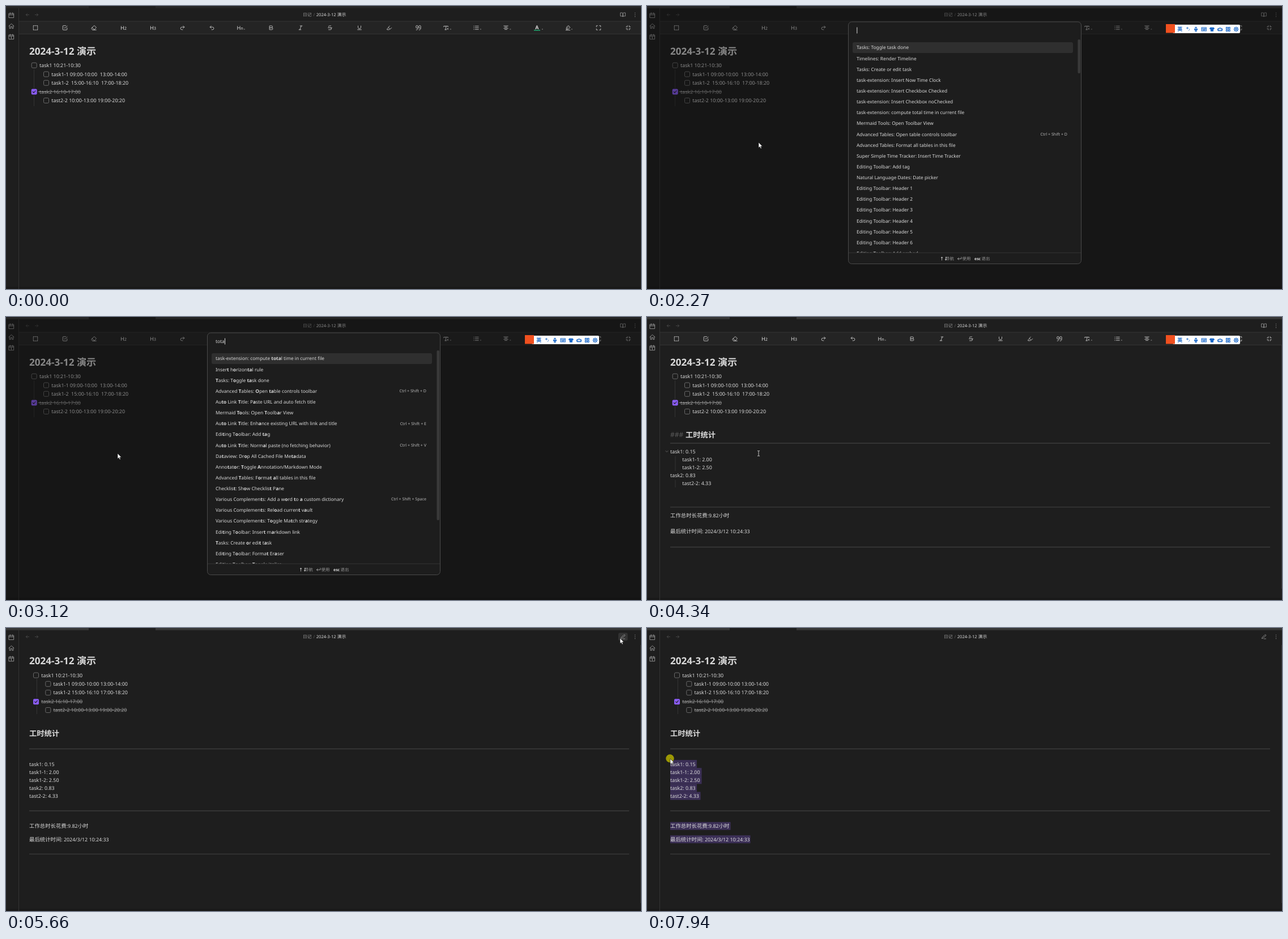
Recreate the animation shown at these times as an HTML page. Size 1121 px wide and 500 px high, loop 8000 ms.

```html
<!DOCTYPE html>
<html lang="zh-CN">
<head>
<meta charset="utf-8">
<title>2024-3-12 演示</title>
<style>
  html, body { margin: 0; width: 100%; height: 100%; overflow: hidden; background: #1e1e1e; }
  svg { display: block; }
  text {
    font-family: "Noto Sans", "Noto Sans CJK SC", "Noto Sans CJK", sans-serif;
    fill: #dadada; white-space: pre; text-rendering: geometricPrecision;
  }
  .bold { font-weight: 700; }
  .muted { fill: #999; }
  .done { fill: #999; text-decoration: line-through; }
  .icon { fill: none; stroke: #d4d4d4; stroke-width: 2; stroke-linecap: round; stroke-linejoin: round; }
  .soft { stroke: #a2a2a2; }
  .faint { stroke: #555; }
  .ime .icon { stroke: #1766c8; }
  .ime text { fill: #1766c8; }
  .rule { stroke: #3b3b3b; stroke-width: 1.3; }
  .guide { stroke: #343434; }
</style>
</head>
<body>
<svg id="stage" width="1121" height="500" viewBox="0 0 1121 500"></svg>
<script>
const LOOP = 8000;
const stage = document.getElementById('stage');

// Drawing helpers: x is the left edge of text, y its vertical middle.
const widenCjk = s => s.replace(/[\u4e00-\u9fff]+/g, '<tspan font-size="1.055em">$&</tspan>');
const text = (x, y, s, size = 8.9, cls = '', extra = '') =>
  `<text x="${x}" y="${y + size * .36}" font-size="${size}" class="${cls}" ${extra}>${cls.includes('bold') ? s : widenCjk(s)}</text>`;
const rect = (x, y, w, h, fill, r = 0, extra = '') =>
  `<rect x="${x}" y="${y}" width="${w}" height="${h}" rx="${r}" fill="${fill}" ${extra}/>`;
const line = (x1, y1, x2, y2, cls) => `<line x1="${x1}" y1="${y1}" x2="${x2}" y2="${y2}" class="${cls}"/>`;
const icon = (x, y, d, size = 10, cls = '', extra = '') =>
  `<path class="icon ${cls}" d="${d}" transform="translate(${x - size / 2} ${y - size / 2}) scale(${size / 24})" ${extra}/>`;
const group = (id, body, extra = '') => `<g id="${id}" ${extra}>${body}</g>`;
const rules = ys => ys.map(y => line(41, y, 1100, y, 'rule')).join('');

const ICON = {
  select: 'M3 7V3h4M10 3h4M17 3h4v4M21 10v4M21 17v4h-4M14 21h-4M7 21H3v-4M3 14v-4',
  check: 'M9 11l3 3L22 4M21 12v7a2 2 0 0 1-2 2H5a2 2 0 0 1-2-2V5a2 2 0 0 1 2-2h11',
  eraser: 'm7 21-4.3-4.3c-1-1-1-2.5 0-3.4l9.6-9.6c1-1 2.5-1 3.4 0l5.6 5.6c1 1 1 2.5 0 3.4L13 21M22 21H7M5 11l9 9',
  redo: 'M15 14l5-5-5-5M20 9H9.5a5.5 5.5 0 0 0 0 11H13',
  undo: 'M9 14L4 9l5-5M4 9h10.5a5.5 5.5 0 0 1 0 11H11',
  bold: 'M6 4h8a4 4 0 0 1 0 8H6zM6 12h9a4 4 0 0 1 0 8H6z',
  italic: 'M19 4h-9M14 20H5M15 4L9 20',
  strike: 'M16 4H9a3 3 0 0 0-2.8 4M14 12a4 4 0 0 1 0 8H6M4 12h16',
  underline: 'M6 4v6a6 6 0 0 0 12 0V4M4 20h16',
  marker: 'm9 11-6 6v3h9l3-3M22 12l-4.6 4.6a2 2 0 0 1-2.8 0l-5.2-5.2a2 2 0 0 1 0-2.8L14 4',
  quote: 'M3 21c3 0 7-1 7-8V5c0-1.2-.8-2-2-2H4C2.800 3 2 3.800 2 5v6c0 1.200.800 2 2 2h4M15 21c3 0 7-1 7-8V5c0-1.200-.800-2-2-2h-4c-1.200 0-2 .800-2 2v6c0 1.200.800 2 2 2h4',
  clear: 'M2 8V5h18v3M7 20h6M12 5l-3 15M16 14l5 5M21 14l-5 5',
  list: 'M8 5h14M8 12h14M8 19h14M2 5h1M2 12h1M2 19h1',
  center: 'M21 4H3M17 9H7M21 14H3M17 19H7',
  pen: 'M5 15l3-8 7-4 6 8-6 6-8 2zM3 22h18M8 16l5-6',
  expand: 'M8 3H3v5M21 8V3h-5M3 16v5h5M16 21h5v-5',
  shrink: 'M8 3v5H3M21 8h-5V3M3 16h5v5M16 21v-5h5',
  calendar: 'M2 4h20v18H2zM2 10h20M7 1v5M17 1v5',
  home: 'M1 12L12 2l11 10M4 10v12h5v-8h6v8h5V10',
  day: 'M2 4h20v18H2zM2 9h20M7 1v5M17 1v5M10 13l2-1v7',
  back: 'M20 12H4M11 19l-7-7 7-7',
  next: 'M4 12h16M13 19l7-7-7-7',
  book: 'M2 3h6a4 4 0 0 1 4 4v14a3 3 0 0 0-3-3H2zM22 3h-6a4 4 0 0 0-4 4v14a3 3 0 0 1 3-3h7z',
  pencil: 'M12 21h9M16.500 3.500a2.100 2.100 0 0 1 4 4L7 19l-4 1 1-4z',
  more: 'M12 4v.1M12 12v.1M12 20v.1',
  fold: 'M4 8l8 8 8-8',
  mic: 'M9 3h6v10H9zM5 11c0 8 14 8 14 0M12 18v4M8 22h8',
  keys: 'M1 4h22v16H1zM5 9h1M10 9h1M14 9h1M18 9h1M5 12h1M10 12h1M14 12h1M18 12h1M7 16h10',
  shirt: 'M8 3L1 7l2 5 3-1v10h12V11l3 1 2-5-7-4-4 3z',
  robot: 'M3 8h18v11H3zM8 13v2M16 13v2M12 4v4M1 12v4M23 12v4',
  grid: 'M3 3h7v7H3zM14 3h7v7h-7zM3 14h7v7H3zM14 14h7v7h-7z',
  gear: 'M12 4a8 8 0 1 0 .1 0M12 9a3 3 0 1 0 .1 0M12 1v3M12 20v3M1 12h3M20 12h3M4 4l2 2M18 18l2 2M20 4l-2 2M6 18l-2 2'
};

const tools = [[52, 'select'], [104, 'check'], [155, 'eraser'], [311.5, 'redo'], [363.5, 'undo'],
  [468, 'bold'], [520, 'italic'], [572, 'strike'], [624, 'underline'], [676.5, 'marker'], [728, 'quote'],
  [777, 'clear'], [830, 'list'], [882.5, 'center'], [992, 'pen'], [1046, 'expand'], [1098.5, 'shrink']];
const toolbar = rect(23, 27, 1098, 22.5, '#242424') + line(23, 27, 1121, 27, 'guide') + line(23, 49.5, 1121, 49.5, 'guide')
  + tools.map(([x, name]) => icon(x, 38.5, ICON[name])).join('')
  + text(202, 38.5, 'H<tspan font-size=".8em">2</tspan>', 9.2, '', 'font-weight="500"')
  + text(254, 38.5, 'H<tspan font-size=".8em">3</tspan>', 9.2, '', 'font-weight="500"')
  + text(407.500, 38.5, 'H<tspan font-size=".8em">n</tspan>', 9.2, '', 'font-weight="500"')
  + text(934.2, 37.800, 'A', 9, 'bold') + rect(932, 42, 11, 1.600, '#22a56f')
  + [420, 784, 837, 889.5, 946, 998].map(x => rect(x, 40.5, 1.800, 1, '#999')).join('');

const checkbox = (x, y, checked) => checked
  ? rect(x - 5, y - 5, 10, 10, '#8a5cf5', 2) + icon(x, y, 'M4 12l6 6L20 6', 7, '', 'style="stroke:#1e1e1e;stroke-width:4"')
  : rect(x - 4.5, y - 4.5, 9, 9, 'none', 2, 'stroke="#6a6a6a"');

const tasks = ['task1 10:21-10:30', 'task1-1 09:00-10:00  13:00-14:00', 'task1-2  15:00-16:10  17:00-18:20',
  'task2 16:10-17:00', 'tast2-2 10:00-13:00 19:00-20:20'];
function taskList(left, ys, reading) {
  return tasks.map((task, i) => {
    const x = left + (/-\d /.test(task.slice(0, 8)) ? 21.3 : 0);
    const done = i === 3 || (reading && i === 4);
    const label = reading ? task.replace(/ +/g, ' ') : task;
    const lead = done && !reading;
    return checkbox(x - 9.3, ys[i], i === 3)
      + text(lead ? x - 2.3 : x, ys[i], lead ? ' ' + label : label, 8.9, done ? 'done' : '');
  }).join('');
}

const totals = ['task1: 0.15', 'task1-1: 2.00', 'task1-2: 2.50', 'task2: 0.83', 'tast2-2: 4.33'];
const sumLine = '工作总时长花费:9.82小时';
const stampLine = '最后统计时间: 2024/3/12 10:24:33';
const title = y => text(41, y, '2024-3-12 演示', 17.1, 'bold');

const editor = toolbar + title(79.500) + line(49.5, 112, 49.5, 145, 'guide') + line(49.5, 158, 49.5, 177, 'guide')
  + taskList(59, [104.8, 120.5, 135.8, 151.5, 167], false)
  + group('caret', rect(41, 189, 1, 12, '#dadada'))
  + group('report',
      text(41, 208, '###', 12, '', 'style="fill:#5c5c5c"') + text(68, 208, '工时统计', 13.25, 'bold')
      + rules([223, 335.800, 406.5])
      + line(50, 246, 50, 272, 'guide') + line(50, 288, 50, 301, 'guide')
      + totals.map((s, i) => text(i % 3 ? 62.3 : 41, 237.500 + i * 14.1, s)).join('')
      + text(41, 350.5, sumLine) + text(41, 378.5, stampLine)
      + line(1120.5, 50, 1120.5, 480, 'guide'))
  + group('fold', icon(35, 237.500, ICON.fold, 6, 'soft'));

// Selectable rows of the reading view: top, height, right edge.
const rows = [[88, 0], [96.5, 1], [96.5, 2], [88, 3], [94.5, 4]].map(([right, i]) => [233.2 + i * 14.1, 14.1, right]);
rows.push([342.800, 14, 147.5], [366.3, 14, 182.5]);

const reader = group('selection', '') + title(57.5)
  + line(54.5, 90, 54.5, 123, 'guide') + line(54.5, 137, 54.5, 152, 'guide')
  + taskList(62.3, [83.5, 98.8, 114.2, 130.2, 145], true)
  + text(41, 186.300, '工时统计', 13.25, 'bold') + rules([213.5, 323, 399.3])
  + totals.map((s, i) => text(41, 240.5 + i * 14.1, s)).join('')
  + text(41, 350, sumLine) + text(41, 373.5, stampLine)
  + line(1120.5, 30, 1120.5, 486, 'guide');

const frame = rect(0, 0, 1121, 500, '#1e1e1e')
  + group('tabs', rect(0, 0, 146, 4, 'inherit') + rect(264, 0, 857, 4, 'inherit').replace('rx', 'data-r')).replaceAll('fill="inherit"', '')
  + rect(0, 496, 1121, 4, '#191919') + line(22.5, 4, 22.5, 500, 'guide')
  + icon(9.5, 16.5, ICON.calendar, 10, 'soft') + icon(9.5, 35.5, ICON.home, 10, 'soft') + icon(9.5, 54.5, ICON.day, 10, 'soft')
  + icon(38, 15.5, ICON.back, 8, 'faint') + icon(54, 15.5, ICON.next, 8, 'faint')
  + text(524, 15.3, '日记', 7.4, 'muted') + text(542.5, 15.3, '/', 7.4, '', 'style="fill:#666"')
  + text(547.800, 15.3, '2024-3-12 演示', 7.5)
  + group('hover', rect(1081, 8.5, 16.5, 14, '#333', 3))
  + group('book', icon(1089, 15.5, ICON.book, 9.5, 'soft')) + group('pencil', icon(1089, 15.5, ICON.pencil, 9.5, 'soft'))
  + icon(1110.5, 15.5, ICON.more, 9.5, 'soft', 'style="stroke-width:3"');

const ime = rect(928, 33, 119, 15, '#fff', 2) + rect(916, 32, 16, 15.5, '#f0501f')
  + text(936.3, 40.8, '英', 9, 'bold')
  + '<circle cx="954" cy="39" r="1.2" fill="none" stroke="#1766c8"/>' + icon(957.5, 42, 'M12 8v4l-4 5', 8)
  + ['mic', 'keys', 'shirt', 'robot', 'grid', 'gear'].map((name, i) =>
      icon(969 + i * 14.2, 41, ICON[name], 9, '', name === 'shirt' ? 'style="fill:#1766c8"' : 'style="stroke-width:3"')).join('');

// Command palette
const ET = 'Editing Toolbar: ', AT = 'Advanced Tables: ', VC = 'Various Complements: ', AL = 'Auto Link Title: ', TE = 'task-extension: ';
const openTable = AT + 'Open table controls toolbar';
const formatTables = AT + 'Format all tables in this file';
const compute = TE + 'compute total time in current file';
const byLetter = ['Tasks: Toggle task done', 'Timelines: Render Timeline', 'Tasks: Create or edit task',
  TE + 'Insert Now Time Clock', TE + 'Insert Checkbox Checked', TE + 'Insert Checkbox noChecked', compute,
  'Mermaid Tools: Open Toolbar View', openTable, formatTables, 'Super Simple Time Tracker: Insert Time Tracker',
  ET + 'Add tag', 'Natural Language Dates: Date picker',
  ...[1, 2, 3, 4, 5, 6].map(n => ET + 'Header ' + n), ET + 'Add embed'];
const byWord = [compute, 'Insert horizontal rule', 'Tasks: Toggle task done', openTable,
  AL + 'Paste URL and auto fetch title', 'Mermaid Tools: Open Toolbar View',
  AL + 'Enhance existing URL with link and title', ET + 'Add tag', AL + 'Normal paste (no fetching behavior)',
  'Dataview: Drop All Cached File Metadata', 'Annotator: Toggle Annotation/Markdown Mode', formatTables,
  'Checklist: Show Checklist Pane', VC + 'Add a word to a custom dictionary', VC + 'Reload current vault',
  VC + 'Toggle Match strategy', ET + 'Insert markdown link', 'Tasks: Create or edit task',
  ET + 'Format Eraser', ET + 'Toggle italics'];
const hotkeys = { [openTable]: 'D', [byWord[6]]: 'E', [byWord[8]]: 'V', [byWord[13]]: 'Space' };
const thumbs = [60, 83, 170, 240, 300, 376];

// Bolds a whole match if there is one, otherwise the letters in order; null when nothing fits.
function highlight(label, query) {
  const lower = label.toLowerCase(), whole = lower.indexOf(query), hits = new Set();
  let at = whole - 1;
  for (const [i, letter] of [...query].entries()) {
    at = whole >= 0 ? whole + i : lower.indexOf(letter, at < 0 ? 0 : at + 1);
    if (at < 0) return null;
    hits.add(at);
  }
  return [...label].map((c, i) => hits.has(i) ? `<tspan class="bold">${c}</tspan>` : c).join('').replaceAll('</tspan><tspan class="bold">', '');
}

function paletteList(query) {
  return (query.length > 1 ? byWord : byLetter)
    .map(label => [label, highlight(label, query)]).filter(item => item[1])
    .map(([label, marked], i) => {
      const y = 73.5 + i * 19.13, key = hotkeys[label];
      return text(370, y, marked, 8.33)
        + (key ? text(742, y - .3, 'Ctrl + Shift + ' + key, 7.1, '', 'text-anchor="end" style="fill:#b8b8b8"') : '');
    }).join('') + rect(760.5, 59, 4.5, thumbs[query.length], '#3a3a3a', 2);
}

const palette = rect(0, 0, 1121, 500, '#0a0a0a', 0, 'opacity=".4"')
  + rect(355.5, 28, 411, 427.500, '#1d1d1d', 6, 'stroke="#4a4a4a"')
  + rect(363, 64, 389, 19, '#2f2f2f', 3)
  + group('list', '', 'clip-path="url(#listClip)"')
  + text(370, 43, '', 8.33).replace('<text', '<text id="query"')
  + group('queryCaret', rect(0, 37.500, 1, 11, '#dadada'))
  + line(356, 436, 766, 436, 'guide')
  + text(517, 446, '↑↓', 7.1, 'bold') + text(527, 446, '导航', 7, 'muted')
  + icon(551.5, 446, 'M22 5v9H3M9 8l-6 6 6 6', 8) + text(556.5, 446, '使用', 7, 'muted')
  + text(578, 446, 'esc', 7, 'bold') + text(590.5, 446, '退出', 7, 'muted');

const pointer = group('press', '<circle cx="-.5" cy="-.5" r="7.2" fill="#9c9804"/>')
  + group('arrow', '<path d="M0 0v9.500l2.200-2 1.500 3.400 1.600-.7-1.500-3.300h3z" fill="#fff" stroke="#111" stroke-width=".6"/>')
  + group('beam', '<path d="M-2-4.500h1.500l.5.500.5-.5H2M-2 4.500h1.500L0 4l.5.500H2M0-4v8" fill="none" stroke="#d8d8d8" stroke-width=".9"/>');

stage.innerHTML = '<defs><clipPath id="listClip"><rect x="356" y="57" width="410" height="379"/></clipPath></defs>'
  + frame + group('editor', editor) + group('reader', reader) + group('palette', palette)
  + group('ime', ime, 'class="ime"') + group('pointer', pointer);

const el = id => document.getElementById(id);
const show = (id, on) => el(id).style.display = on ? '' : 'none';
const within = (t, from, to) => t >= from && t < to;

// start, end, poses, from x y, to x y, downward bow
const moves = [
  [320, 1070, 11, 936, 483, 229, 259, 0],
  [1140, 1270, 3, 215, 251, 197, 241, 0],
  [4340, 5100, 11, 197, 241, 1078, 16, 0],
  [5170, 5240, 2, 1081, 17, 1084, 18, 0],
  [5660, 5930, 5, 1084, 18, 512, 350, 0],
  [5930, 6060, 3, 512, 350, 423, 380, 0],
  [6265, 6790, 9, 423, 380, 218.5, 383, 40],
  [6925, 7120, 4, 218.5, 383, 210, 384, 0],
  [7260, 7940, 10, 210, 384, 41, 231, 0]
];
function pointerAt(t) {
  const move = moves.filter(m => m[0] <= t).pop();
  if (!move) return null;
  const [start, end, poses, x0, y0, x1, y1, bow] = move;
  const p = Math.min(1, Math.floor((t - start) / (end - start) * (poses - 1) + 1e-6) / (poses - 1));
  const e = p * p * (3 - 2 * p);
  return { x: x0 + (x1 - x0) * e, y: y0 + (y1 - y0) * e + bow * Math.sin(Math.PI * e) };
}

function selectionTo({ x, y }) {
  return rows.map(([top, height, right]) => {
    const from = y < top ? 41 : Math.max(41, x);
    return y < top + height && from < right ? rect(from, top, right - from, height, '#3b2f56') : '';
  }).join('');
}

const keyTimes = [2730, 2860, 2990, 3120, 3190];
let shownQuery = null;
function showQuery(query) {
  if (query === shownQuery) return;
  shownQuery = query;
  el('list').innerHTML = paletteList(query);
  const field = el('query');
  field.textContent = query;
  el('queryCaret').setAttribute('transform', `translate(${370.3 + field.getComputedTextLength()} 0)`);
}

function draw(t) {
  const reading = t >= 5460, paletteOpen = within(t, 2190, 3740), at = pointerAt(t);
  el('tabs').setAttribute('fill', t < 1270 ? '#262626' : '#363636');
  show('editor', !reading);
  show('reader', reading);
  show('book', !reading);
  show('pencil', reading);
  show('caret', within(t, 1270, 1930));
  show('report', t >= 3810);
  show('fold', within(t, 4340, 4480));
  show('ime', within(t, 70, 5460));
  show('palette', paletteOpen);
  if (paletteOpen) {
    el('palette').setAttribute('opacity', t < 2270 ? .5 : 1);
    showQuery('total'.slice(0, keyTimes.filter(k => k <= t).length));
  }
  show('pointer', at);
  show('hover', at && at.x > 1080 && at.y < 23);
  if (at) {
    const arrow = paletteOpen || reading || at.y < 49;
    el('pointer').setAttribute('transform', `translate(${at.x} ${at.y})`);
    show('arrow', arrow);
    show('beam', !arrow);
    show('press', within(t, 1270, 1400) || within(t, 5310, 5450) || t >= 7260);
  }
  el('selection').innerHTML = t >= 7260 ? selectionTo(at) : '';
}

const began = performance.now();
function tick() {
  draw((performance.now() - began) % LOOP);
  requestAnimationFrame(tick);
}
tick();
</script>
</body>
</html>
```
